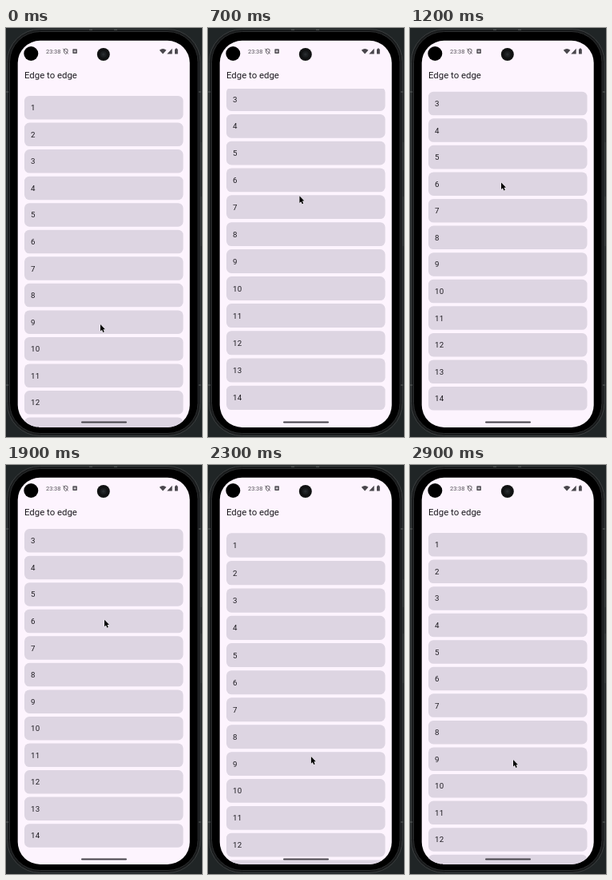
Write an HTML page that moves like this. It is 245 px wide and 512 px high and loops after 3000 ms.

```html
<!DOCTYPE html>
<html lang="en">
<head>
<meta charset="utf-8">
<title>Edge to edge list</title>
<style>
  html, body { margin: 0; width: 100%; height: 100%; overflow: hidden; background: #202526; }
  svg { display: block; width: 245px; height: 512px; }
  text { font-family: Roboto, "Open Sans", sans-serif; fill: #1d1b20; }
  .row text { font-size: 9.7px; letter-spacing: .2px; }
  .row rect { fill: #ddd5e2; }
</style>
</head>
<body>
<svg viewBox="0 0 245 512" xmlns="http://www.w3.org/2000/svg">
  <defs>
    <clipPath id="screen"><rect x="14.7" y="15.8" width="215" height="484.2" rx="28"/></clipPath>
    <clipPath id="viewport"><rect x="14" y="76" width="216" height="424"/></clipPath>
  </defs>

  <!-- phone body -->
  <rect width="245" height="512" fill="#202526"/>
  <rect x="1.5" y="1.5" width="241.5" height="509" rx="41" fill="#191b1c" stroke="#3c3f40"/>
  <rect x="4.5" y="4.5" width="235.5" height="503" rx="38" fill="#000" stroke="#2b2d2e"/>
  <path d="M104 2h4M135 2h4M0 80h3M0 447h3M241 80h3M241 447h3" stroke="#4a4d4e" stroke-width="1.5"/>
  <path d="M243.7 143v35M243.7 211v62" stroke="#363a3b" stroke-width="1.4"/>

  <g clip-path="url(#screen)">
    <rect x="14" y="15" width="217" height="486" fill="#fdf4fe"/>
    <g id="list" clip-path="url(#viewport)"></g>
    <text x="23" y="63.3" font-size="11.4">Edge to edge</text>

    <!-- status bar -->
    <text x="50" y="32" font-size="7.4" style="fill:#57545a">23:38</text>
    <path d="M72.4 27l2.2-1 2.4 1v2.2q0 2.2-2.4 3.4-2.2-1.2-2.2-3.4zM71.3 25.8l6.4 6.6"
          fill="none" stroke="#57545a" stroke-width=".9"/>
    <rect x="83.3" y="26.3" width="5.6" height="5.8" rx=".8" fill="#57545a"/>
    <path d="M86.1 27.7v3M84.6 29.2h3" stroke="#fdf4fe" stroke-width=".8"/>
    <g fill="#49464c">
      <path d="M191.8 27.7q4.3-3.6 8.6 0L196.1 32.6z"/>
      <path d="M207.7 25.7v6.9h-6.4z"/>
      <path d="M211 26.5h1v-.9h1.8v.9h1v6.1H211z"/>
    </g>

    <rect x="94" y="492.4" width="57" height="2" rx="1" fill="#46434a"/>
  </g>

  <circle cx="31.3" cy="32" r="9" fill="#000"/>
  <circle cx="121.8" cy="33" r="8" fill="#111213"/>
  <circle cx="121.8" cy="33" r="4" fill="#1c1f21"/>
  <circle cx="121.8" cy="33" r="1.8" fill="#292d30"/>

  <path id="cursor" d="M0 0V8.6L2 6.8 3.3 9.9 4.8 9.3 3.5 6.2H6Z"
        fill="#000" stroke="#fff" stroke-width=".8" stroke-linejoin="round" paint-order="stroke"/>
</svg>
<script>
const LOOP = 3000, STEP = 100;
const TOP = 76, BOTTOM = 500;
const FIRST = 85, PITCH = 33.55, HEIGHT = 29.5, ROWS = 14;
const MAX_SCROLL = 72, SLOP = 4, LAG = 50;
const STIFFNESS = .1, FALLOFF = 220, RELAX = 110;

const swipeUp = { start: 224, length: 588, distance: 177.5, release: 850 };
const swipeDown = { start: 1890, length: 450, distance: 175.5, release: 2400 };

const list = document.getElementById("list");
const cursor = document.getElementById("cursor");

function add(parent, name, attributes) {
  const node = document.createElementNS("http://www.w3.org/2000/svg", name);
  for (const key in attributes) node.setAttribute(key, attributes[key]);
  return parent.appendChild(node);
}

const rows = Array.from({ length: ROWS }, (_, i) => {
  const group = add(list, "g", { class: "row" });
  const card = add(group, "rect", { x: 23, width: 198.5, rx: 6.3 });
  const label = add(group, "text", { x: 31 });
  label.textContent = i + 1;
  return { card, label };
});

function ease(time, start, length) {
  const p = Math.min(1, Math.max(0, (time - start) / length));
  return p * p * (3 - 2 * p);
}

const progress = (time, swipe) => ease(time, swipe.start, swipe.length);

// The list follows the pointer late; what exceeds the scroll range becomes a stretch that relaxes on release.
function drag(time, swipe) {
  const moved = Math.max(0, swipe.distance * progress(time - LAG, swipe) - SLOP);
  const scroll = Math.min(moved, MAX_SCROLL);
  const hold = Math.exp(-Math.max(0, time - swipe.release) / RELAX);
  return { scroll, pull: (moved - scroll) * STIFFNESS * hold };
}

// The stretch is anchored at the edge that is being pulled.
function stretch(y, pull) {
  const distance = Math.max(0, pull > 0 ? y - TOP : BOTTOM - y);
  return y + pull * (1 - Math.exp(-distance / FALLOFF));
}

function drawRows(scroll, pull) {
  rows.forEach(({ card, label }, i) => {
    const start = FIRST + i * PITCH - scroll;
    const top = stretch(start, pull);
    const bottom = stretch(start + HEIGHT, pull);
    card.setAttribute("y", top);
    card.setAttribute("height", bottom - top);
    label.setAttribute("y", (top + bottom) / 2 + 3.5);
  });
}

function drawCursor(time) {
  const up = progress(time, swipeUp), down = progress(time, swipeDown);
  const x = 118 - 4 * up + 9 * ease(time, 1400, 300) + 6 * down;
  const y = 371 - swipeUp.distance * up + swipeDown.distance * down;
  cursor.setAttribute("transform", `translate(${x} ${y})`);
}

function draw(time) {
  const up = drag(time, swipeUp), down = drag(time, swipeDown);
  drawRows(up.scroll - down.scroll, down.pull - up.pull);
  drawCursor(time);
}

function tick() {
  const time = performance.now() % LOOP;
  draw(Math.floor(time / STEP) * STEP);
  requestAnimationFrame(tick);
}
tick();
</script>
</body>
</html>
```
